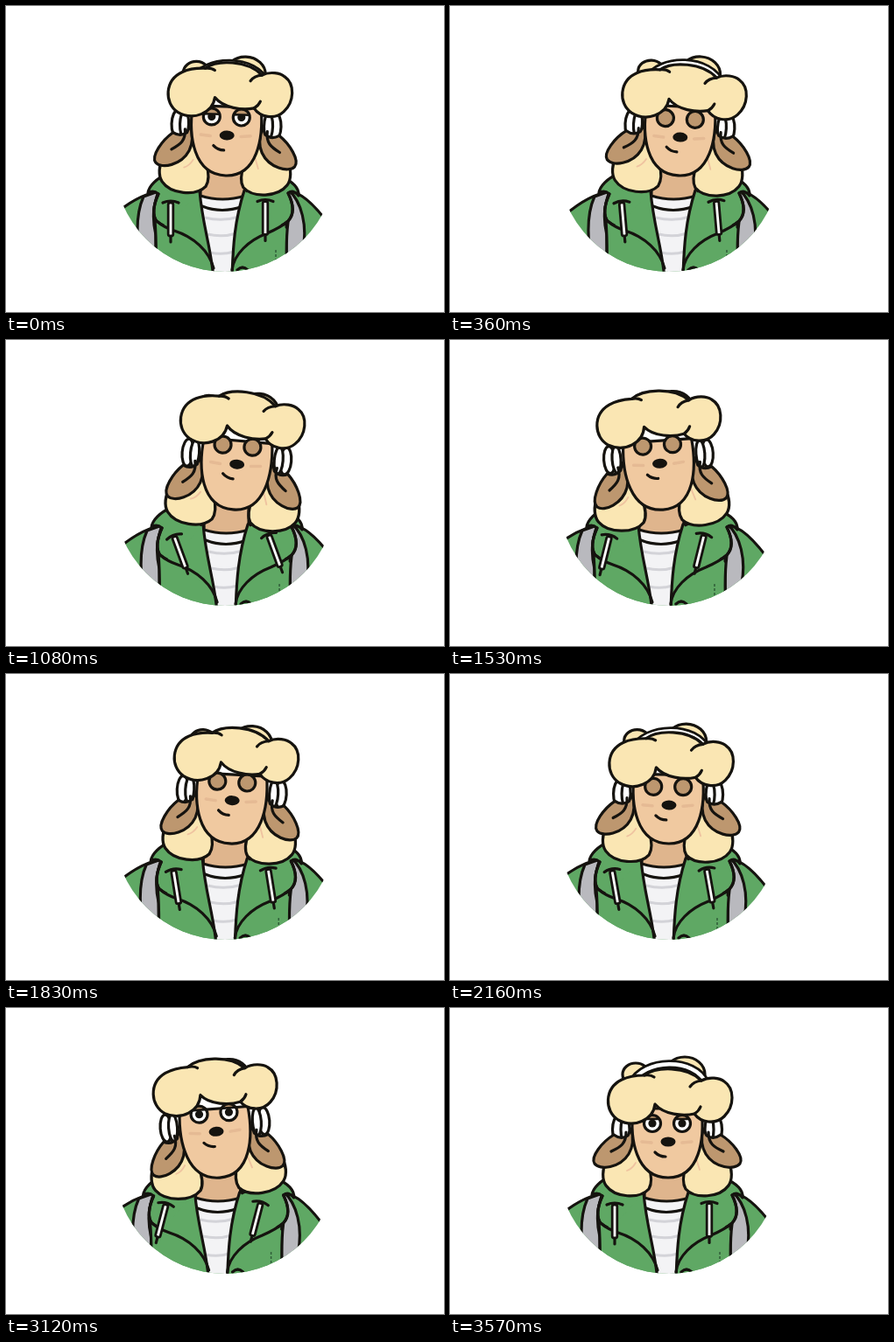
An HTML page that plays this animation: 500 by 350 pixels, repeating every 8000 ms.

```html
<!DOCTYPE html>
<html lang="en">
<head>
<meta charset="utf-8">
<title>Sheep listening to music</title>
<style>
  html, body { margin: 0; width: 100%; height: 100%; overflow: hidden; background: #fff; }
  svg { display: block; width: 500px; height: 350px; }
  .ink { stroke: #15130f; stroke-width: 3.2; stroke-linecap: round; stroke-linejoin: round; }
  .line { fill: none; }
  .hair { fill: #fae6b3; }
  .skin { fill: #f0c9a0; }
  .neck { fill: #dfb58d; }
  .ear { fill: #bd976f; }
  .coat { fill: #5fa864; }
  .strap { fill: #b9b9be; }
  .white { fill: #fff; }
  .stripe { fill: none; stroke: #d3d3d8; stroke-width: 3; }
  .blush { fill: none; stroke: #e5ba94; stroke-width: 3.5; stroke-linecap: round; }
  .thin { fill: none; stroke: #efc3a0; stroke-width: 1.8; stroke-linecap: round; }
</style>
</head>
<body>
<svg viewBox="0 0 500 350">
  <defs>
    <clipPath id="disc"><circle cx="250" cy="177" r="127"/></clipPath>
    <clipPath id="round"><circle r="9.5"/></clipPath>

    <g id="cord">
      <path class="ink line" d="M0 36V45"/>
      <rect class="ink white" x="-2.8" y="0" width="5.6" height="38" rx="2" style="stroke-width:2.8"/>
      <path class="ink line" d="M-9 0Q0 -4 9 0"/>
    </g>

    <g id="lock">
      <path class="ink hair" d="M208 145C178 158 169 190 178 203C188 217 216 219 227 207C234 195 226 170 208 145Z"/>
    </g>

    <g id="side">
      <g id="cup">
        <ellipse class="ink white" cx="192" cy="139" rx="6.5" ry="15.5"/>
        <ellipse class="ink white" cx="200" cy="139" rx="5" ry="15.5"/>
      </g>
      <g id="ear">
        <path class="ink ear" d="M187 145C174 153 160 170 165 178C171 186 194 183 204 167C210 157 209 146 207 138L203 146Q195 151 187 145Z"/>
        <path class="ink line" d="M201 142C201 155 195 159 184 164"/>
      </g>
    </g>

    <g id="eye">
      <g clip-path="url(#round)">
        <circle class="white" r="10"/>
        <circle r="4.6" fill="#15130f"/>
        <rect class="lower ear" x="-11" width="22" height="22"/>
        <rect class="upper ink ear" x="-13" y="-22" width="26" height="22" style="stroke-width:2.6"/>
      </g>
      <circle class="ink line" r="9.5"/>
    </g>
  </defs>

  <g clip-path="url(#disc)">
    <g id="body">
      <path class="ink coat" d="M100 330V262Q138 220 170 213H328Q350 218 388 278V330Z"/>
      <path class="ink strap" d="M157 218C147 240 149 275 157 310H171V262C166 240 169 226 174 212Z"/>
      <path class="ink strap" d="M322 210C338 224 344 252 339 278L332 310H320V255Z"/>
      <path class="ink coat" d="M184 192C172 197 163 206 162 214Q168 210 174 215C168 228 167 240 172 246Q182 254 195 257L222 213Z"/>
      <path class="ink coat" d="M312 194C326 200 335 208 334 217Q328 209 322 214C328 226 330 238 322 246Q314 253 300 257L272 213Z"/>
      <path d="M220 210H274L258 312H238Z" fill="#f3f3f5"/>
      <path class="stripe" d="M227 242Q247 247 266 241M230 261Q247 265 263 260M233 282Q247 285 260 281"/>
      <path class="neck ink" d="M222 180H273V217Q247 225 222 217Z"/>
      <path class="ink line" d="M224 229Q247 238 270 229"/>
      <path class="coat" d="M221 211C224 250 234 275 237 312H170V258L195 240Z"/>
      <path class="coat" d="M272 211C261 245 259 275 258 312H320V255L298 235Z"/>
      <path class="ink line" d="M221 211C224 250 234 275 237 312M272 211C261 245 259 275 258 312"/>
      <path class="ink line" d="M174 215C168 228 167 240 172 246Q180 253 192 257C214 264 232 280 237 300"/>
      <path class="ink line" d="M322 214C328 226 329 238 322 246Q314 253 298 260C277 268 260 284 258 302"/>
      <path class="ink line" d="M170 246Q172 270 171 312M322 247Q319 270 321 312"/>
      <path class="ink line" d="M264 302Q270 296 276 302"/>
      <path d="M308 279V292" stroke="#2f5d38" stroke-width="1.5" stroke-dasharray="3 2"/>
      <use id="cordL" href="#cord"/>
      <use id="cordR" href="#cord"/>
    </g>
  </g>

  <g id="head">
    <g id="locks">
      <use href="#lock"/>
      <use href="#lock" transform="matrix(-1 0 0 1 496 0)"/>
      <path class="thin" d="M202 186Q208 184 212 177M281 172L285 185"/>
    </g>
    <g id="crown">
      <ellipse class="ink hair" cx="212" cy="76" rx="15" ry="13"/>
      <ellipse class="ink hair" cx="268" cy="76" rx="23" ry="20"/>
      <path class="ink line" d="M208 86C220 58 280 56 292 86" style="stroke-width:10"/>
      <path class="line" d="M208 86C220 58 280 56 292 86" stroke="#fff" stroke-width="4.5"/>
    </g>
    <use href="#side"/>
    <use href="#side" transform="matrix(-1 0 0 1 496 0)"/>
    <path class="ink skin" d="M209 115C205 150 212 194 249 194C285 194 291 150 287 115Z"/>
    <g id="face">
      <path class="blush" d="M219 153L230 154M265 154L276 153"/>
      <use href="#eye" x="231" y="132"/>
      <use href="#eye" x="265" y="132"/>
      <ellipse cx="249" cy="153" rx="8.5" ry="5.5" fill="#15130f"/>
      <path class="ink line" d="M234 165Q239 170 246 170"/>
      <path class="ink hair" d="M196 82C204 78 216 77 222 77C235 67 270 66 287 83C296 78 308 80 313 84C325 92 325 112 313 124C303 134 286 131 279 121C266 124 244 122 234 110C232 128 210 138 192 128C176 118 176 92 196 82Z"/>
      <path class="ink line" d="M222 77Q229 76 233 79M287 83Q278 84 274 90M279 121Q284 118 286 113"/>
    </g>
  </g>
</svg>
<script>
const LOOP = 8000, SWAY = 800, STOP = 3570;
// One sway: phase in degrees, then body x, head x, tilt, lift, cord angle
const sway = [
  [0, -3, -1, -5, 9, 14],
  [18, -6, -5, -4, 12, 14],
  [50, -8, -8, -3, 4, 7],
  [122, 2, 1, -0.5, 3, 10],
  [175, 4, 9, 5, 11, -20],
  [211, 8, 11, 3, 3, -5],
  [302, -3, 0.5, 0.5, 3, -10]
];
const start = [0, 1.5, 1.7, 5, 0], rest = [0, 0, 0, 0, 0];

const $ = id => document.getElementById(id);
const set = (el, value) => el.setAttribute('transform', value);
const mix = (a, b, k) => a + (b - a) * k;
const smooth = x => { x = Math.min(1, Math.max(0, x)); return x * x * (3 - 2 * x); };
const blend = (a, b, k) => a.map((v, i) => mix(v, b[i], k));

// Key i of the endless cycle
function key(i) {
  const n = sway.length, turn = Math.floor(i / n);
  const [deg, ...pose] = sway[i - turn * n];
  return { deg: deg + 360 * turn, pose };
}

// Smooth curve through the cyclic keys
function swayPose(deg) {
  deg = (deg % 360 + 360) % 360;
  let i = sway.length - 1;
  while (sway[i][0] > deg) i--;
  const [a, b, c, d] = [i - 1, i, i + 1, i + 2].map(key);
  const span = c.deg - b.deg, k = (deg - b.deg) / span, k2 = k * k, k3 = k2 * k;
  return b.pose.map((p, j) => {
    const q = c.pose[j];
    const m = (q - a.pose[j]) / (c.deg - a.deg) * span;
    const n = (d.pose[j] - p) / (d.deg - b.deg) * span;
    return mix(p, q, 3 * k2 - 2 * k3) + m * (k3 - 2 * k2 + k) + n * (k3 - k2);
  });
}

function poseAt(t) {
  const moving = swayPose((t - 690) / SWAY * 360);
  return blend(blend(start, moving, smooth(t / 250)), rest, smooth((t - 3200) / (STOP - 3200)));
}

function lidAt(t) {
  return t < 1500 ? -3 + 13 * smooth(t / 300) : 10 - 15 * smooth((t - 2560) / 450);
}

function draw(t) {
  const [body, head, tilt, lift, cord] = poseAt(t);
  set($('body'), `translate(${body} 0)`);
  set($('cordL'), `translate(188 225) rotate(${cord})`);
  set($('cordR'), `translate(296 223.5) rotate(${cord})`);
  set($('head'), `translate(${head} 0) rotate(${tilt} 250 205)`);
  set($('locks'), `translate(248 0) scale(${1 + lift * 0.004} 1) translate(-248 0)`);
  set($('crown'), `translate(0 ${lift * 0.3})`);
  set($('cup'), `translate(0 ${-lift * 0.5})`);
  set($('ear'), `rotate(${-lift * 1.1} 203 142)`);
  set($('face'), `translate(0 ${-lift})`);

  const lid = lidAt(t), lower = lid < 4 ? 8 - lid : lid;
  set(document.querySelector('.upper'), `translate(0 ${lid})`);
  set(document.querySelector('.lower'), `translate(0 ${lower})`);
}

function tick(now) {
  draw(now % LOOP);
  requestAnimationFrame(tick);
}
draw(0);
requestAnimationFrame(tick);
</script>
</body>
</html>
```
